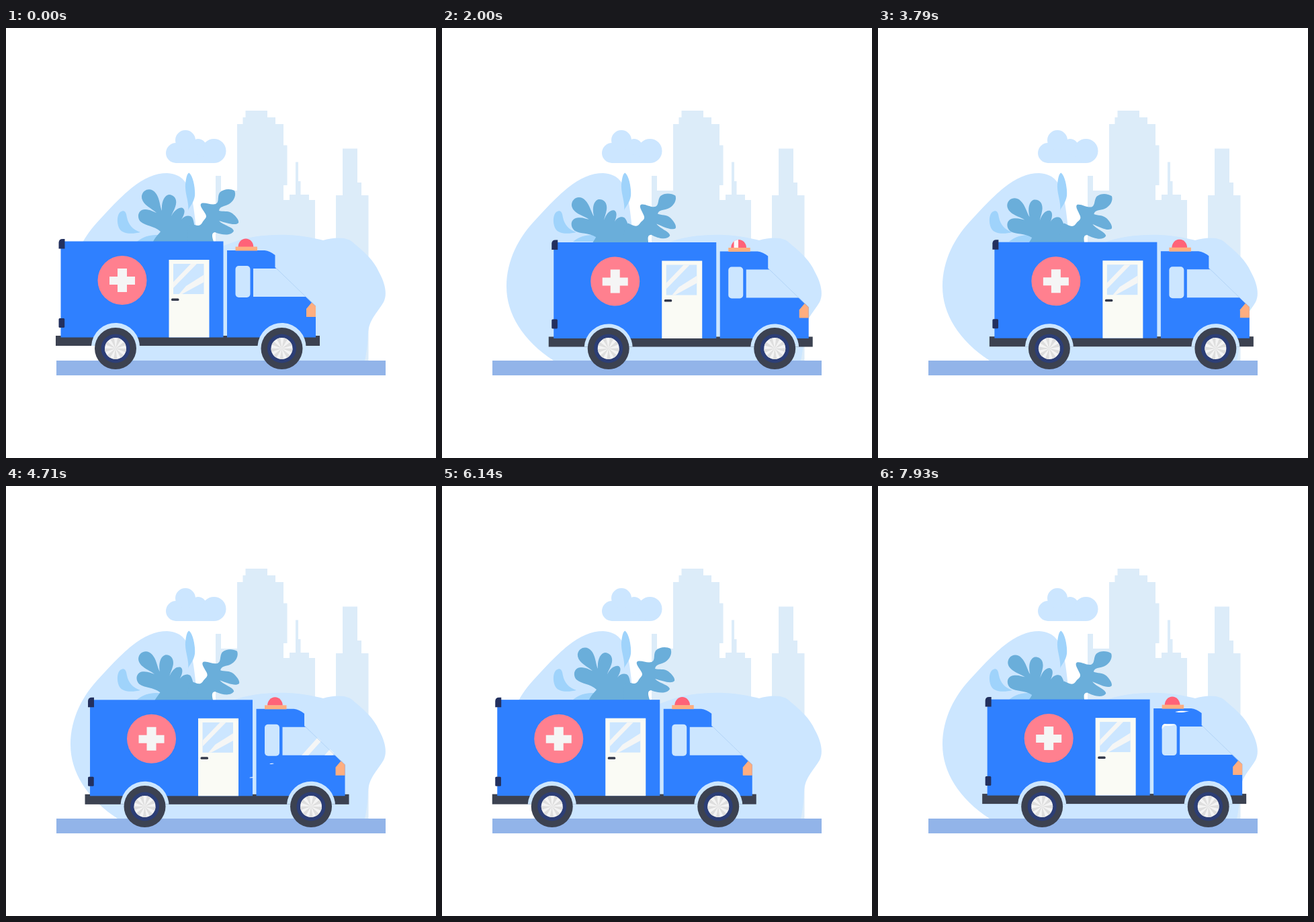
Recreate the animation shown at these times as an HTML page. Size 640 by 640 pixels, loop 8000 ms.

```html
<!DOCTYPE html>
<html lang="en">
<head>
<meta charset="utf-8">
<title>Ambulance</title>
<style>
html, body { margin: 0; width: 100%; height: 100%; overflow: hidden; background: #fff; }
svg { display: block; width: 100vw; height: 100vh; }
</style>
</head>
<body>
<svg viewBox="0 0 640 640">
  <defs>
    <clipPath id="cabGlass">
      <rect x="341.5" y="354" width="22" height="47" rx="5"/>
      <path d="M368 358H403L448 400H368Z"/>
    </clipPath>
    <clipPath id="dome"><path d="M345.5 326a11.4 12.6 0 0 1 22.8 0Z"/></clipPath>
    <clipPath id="doorGlass"><rect x="249" y="351" width="45.500" height="45"/></clipPath>
    <g id="wheel">
      <circle r="31" fill="#3c4251"/>
      <circle r="21.500" fill="#2c3e76"/>
      <circle r="16" fill="#f4f4f4"/>
      <circle class="hub" r="8" fill="none" stroke="#dedede" stroke-width="16" stroke-dasharray="2.793"/>
    </g>
  </defs>

  <path fill="#dcecf9" d="M312 220H320V242H344V143H352.500V133H356.500V123H389V133H401V143H413V174.500H418.500V234H413V256H422V248H431V199.500H435V228H438.500V248H451V256H460V495H312ZM491 249H501V179.500H523V230H529V249H539.500V495H491Z"/>
  <g fill="#cce6ff">
    <path d="M166 495C120 465 96 425 96 385C96 345 115 312 135 290C153 270 170 252 187 238C206 223 222 216 240 216C262 217 272 231 277 255C283 285 281 300 288 316C298 332 318 327 335 320C360 310 390 307 420 308C443 309 460 313 472 316C486 312 505 310 515 318C534 334 547 345 555 363C566 383 567 398 562 408C552 425 540 434 539 455C538 472 537 482 534 495Z"/>
    <rect x="238" y="171" width="40" height="30" rx="15"/>
    <path d="M252 180H310V201H252Z"/>
    <circle cx="267" cy="167" r="15"/>
    <circle cx="286" cy="177" r="12"/>
    <circle cx="309.500" cy="183" r="18"/>
  </g>
  <g fill="#9fd3fb">
    <path d="M272.500 215.500C279 221 282 240 281 250C279 262 272 267 271 272C273 260 266 246 267 233C268 222 270 216 272.500 215.500Z"/>
    <path d="M173 272.500C165 274 164 290 169 299C174 307 188 307 200 304C188 300 182 292 180 282C179 275 177 271 173 272.500Z"/>
    <path d="M195 318C205 309 220 306 233 309V318Z"/>
  </g>
  <g fill="#6aaeda">
    <path id="leafL" d="M219 318C222 311 228 306 230 303C220 294 208 295 200 288C194 281 197 270 207 270C215 270 220 274 224 275C216 268 201 262 202 250C204 239 217 237 223 246C229 254 229 266 232 272C231 260 235 249 243 248C253 249 255 258 252 266C250 272 247 276 246 280C250 272 257 266 263 268C268 271 265 279 261 285C266 279 273 278 277 282C281 288 280 300 284 318L282 334H219Z"/>
    <path id="leafR" d="M270 334C271 315 268 298 275 291C282 293 288 297 292 290C295 284 300 283 297 277C293 270 287 264 291 261C297 259 305 264 312 262C318 259 314 251 318 245C324 239 334 239 340 242C343 248 340 257 332 262C325 266 318 265 317 272C323 274 330 271 337 276C343 281 347 286 346 290C341 295 328 290 317 287C324 294 338 296 339 302C335 310 321 308 311 304C306 305 306 309 309 318V334Z"/>
  </g>
  <rect x="75" y="495" width="490" height="22" fill="#92b4e9"/>

  <g id="body">
    <rect x="74" y="458" width="393" height="15" fill="#3c4251"/>
    <rect x="81.500" y="317.500" width="242" height="143" fill="#2f80ff"/>
    <path fill="#2f80ff" d="M329 331H385Q393 332 400.500 338V356L461 414V460.500H329Z"/>
    <g fill="#23305e">
      <path d="M87.500 314V328.500H78.500V319Q79 314 84 314Z"/>
      <rect x="78.500" y="432" width="8.700" height="14" rx="1.500"/>
    </g>
    <circle cx="173" cy="375.500" r="36.500" fill="#ff808f"/>
    <path fill="#f5f5f5" d="M166 358H180V370H192V382H180V393H166V382H154V370H166Z"/>
    <rect x="242.500" y="345" width="60" height="115.500" fill="#fafbf5"/>
    <rect x="249" y="351" width="45.500" height="45" fill="#cce6ff"/>
    <path clip-path="url(#doorGlass)" fill="#f5f6f5" d="M249 378L275 351H284L249 387ZM256 398L268 384L295 367V378L262 396Z"/>
    <rect x="246" y="402.500" width="11.500" height="3.500" rx="1.500" fill="#33394a"/>
    <rect x="341.500" y="354" width="22" height="47" rx="5" fill="#cce6ff"/>
    <path fill="#cce6ff" d="M368 358H403L448 400H368Z"/>
    <g clip-path="url(#cabGlass)">
      <path id="shine" fill="#f5f6f6" d="M397 400H416L461 350H442ZM354 400H366L411 350H399ZM320 400H330L375 350H365Z"/>
    </g>
    <path d="M400.500 356L455 408.500" stroke="#a9cdf2" stroke-width=".7"/>
    <path fill="#ffae80" d="M455 408.500L461 414V430H447V418Z"/>
    <g clip-path="url(#dome)">
      <rect x="345" y="312" width="24" height="15" fill="#ff6378"/>
      <rect id="flash" x="353.700" y="312" width="6.500" height="15" fill="#fafafa"/>
    </g>
    <rect x="341.500" y="325.500" width="32.500" height="6" fill="#ffae80"/>
    <path fill="#cce6ff" d="M127 473a36 36 0 0 1 72 4V473ZM374.500 473a36 36 0 0 1 72 4V473Z"/>
  </g>
  <g id="wheels">
    <use href="#wheel" x="163" y="477"/>
    <use href="#wheel" x="410.500" y="477"/>
  </g>
  <g id="wind" fill="#fff"></g>
</svg>
<script>
const LOOP = 8000, CYCLE = 6000, FORWARD = 2960, TRAVEL = 112.5;
const $ = id => document.getElementById(id);
const set = (el, value) => el.setAttribute('transform', value);
const clamp = v => Math.max(0, Math.min(1, v));
const ease = v => { v = clamp(v); return v * v * (3 - 2 * v); };
const hub = document.querySelector('.hub');

// Gusts: start time, duration, path length, then [x, y] of each wisp
const high = [[498, 336], [479, 356]], low = [[399, 413.5], [369, 434]];
const gusts = [
  [1130, 700, 66, high], [2250, 700, 66, high], [4630, 950, 225, low],
  [6530, 700, 66, high], [7500, 700, 66, high]
];

// A thin wisp, sharp at the right, rounded at the left
function wisp(x1, x2, y) {
  const w = x2 - x1, h = Math.min(1.6, w / 8);
  return `<path d="M${x2} ${y - h * .5}C${x1 + w * .6} ${y - h} ${x1 + w * .3} ${y - h} ${x1} ${y}` +
    `C${x1 + w * .2} ${y + h} ${x1 + w * .5} ${y + h} ${x2} ${y - h * .5}Z"/>`;
}

function wind(t) {
  let out = '';
  for (const [start, span, length, wisps] of gusts) {
    const p = (t - start) / span;
    if (p <= 0 || p >= 1) continue;
    const head = ease(p / .82) * length, tail = ease((p - .2) / .8) * length;
    for (const [x, y] of wisps) if (head - tail > 1) out += wisp(x - head, x - tail, y);
  }
  $('wind').innerHTML = out;
}

function draw(t) {
  const c = t % CYCLE;
  const k = c < FORWARD ? ease(c / FORWARD) : 1 - ease((c - FORWARD) / (CYCLE - FORWARD));
  const x = TRAVEL * k;
  const bounce = .75 * (1 - Math.cos(2 * Math.PI * t / 570));

  set($('body'), `translate(${x} ${bounce})`);
  set($('wheels'), `translate(${x} 0)`);
  set(hub, `rotate(${x / 31 * 180 / Math.PI})`);
  set($('leafL'), `rotate(${-12.5 * k} 280 312)`);
  set($('leafR'), `rotate(${9 * k} 280 308)`);

  const u = t % 1765 - 1025;
  const shift = u < -400 || u > 400 ? -300 : .6 * u - .0007 * u * u;
  set($('shine'), `translate(${shift} 0)`);
  set($('flash'), `translate(${(t % 790 - 460) * .1} 0)`);
  wind(t);
}

function tick(now) {
  draw(now % LOOP);
  requestAnimationFrame(tick);
}
draw(0);
requestAnimationFrame(tick);
</script>
</body>
</html>
```
